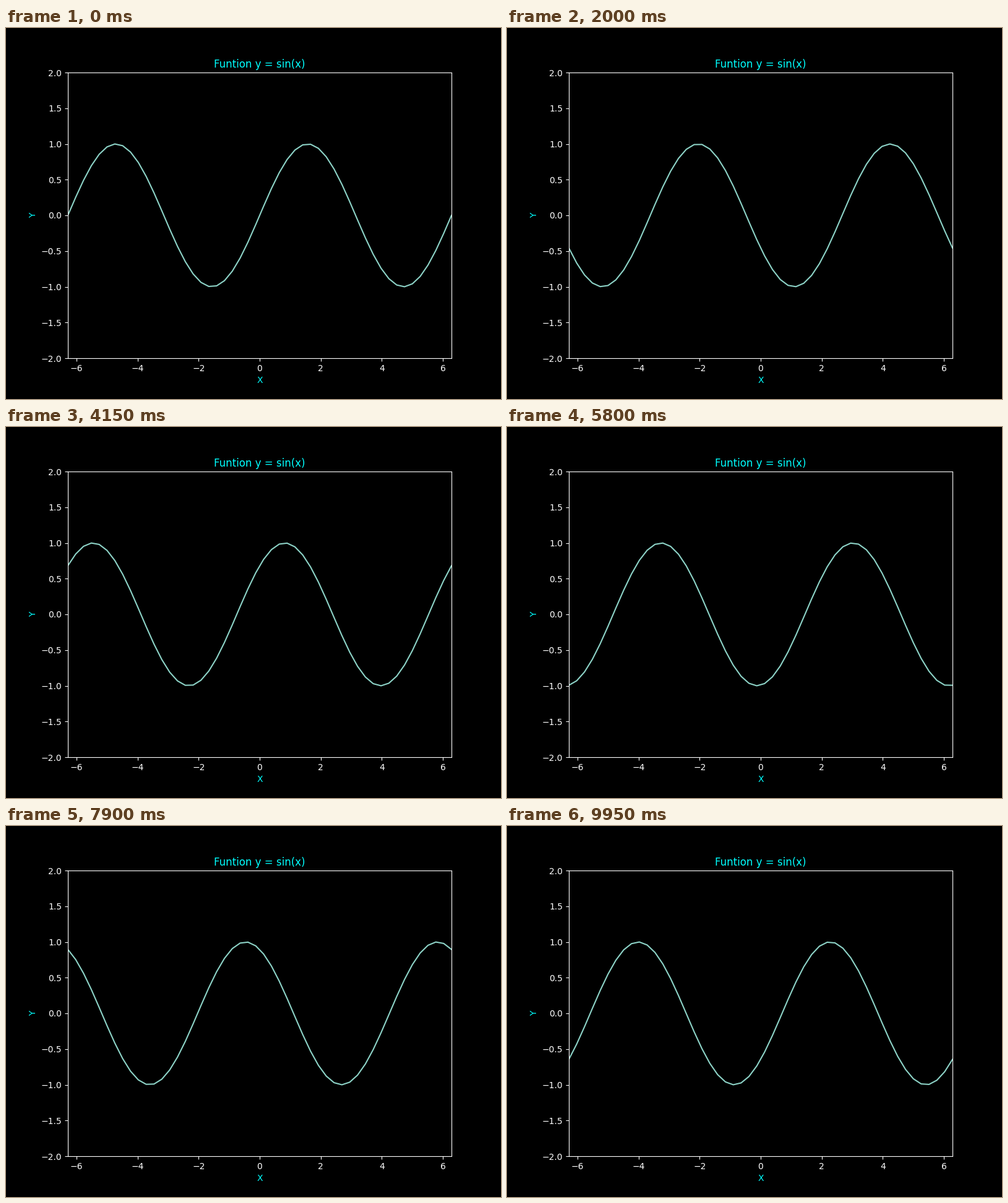
A matplotlib script that plays this animation: 800 by 600 pixels, repeating every 10 s.

```python
import numpy as np
import matplotlib.pyplot as plt
from matplotlib.animation import FuncAnimation

FRAMES = 200
INTERVAL = 50  # ms
PHASE_STEP = 1 / 15  # radians per frame

plt.style.use("dark_background")
plt.rcParams["font.family"] = "DejaVu Sans"

fig, ax = plt.subplots(figsize=(8, 6), dpi=100)
ax.set_xlim(-2 * np.pi, 2 * np.pi)
ax.set_ylim(-2, 2)
ax.set_title("Funtion y = sin(x)", color="cyan")
ax.set_xlabel("X", color="cyan")
ax.set_ylabel("Y", color="cyan")

x = np.linspace(-2 * np.pi, 2 * np.pi, 50)
line, = ax.plot(x, np.sin(x))


def update(frame):
    line.set_ydata(np.sin(x - frame * PHASE_STEP))
    return line,


anim = FuncAnimation(fig, update, frames=FRAMES, interval=INTERVAL,
                     repeat=True, repeat_delay=0)

plt.show()
```
